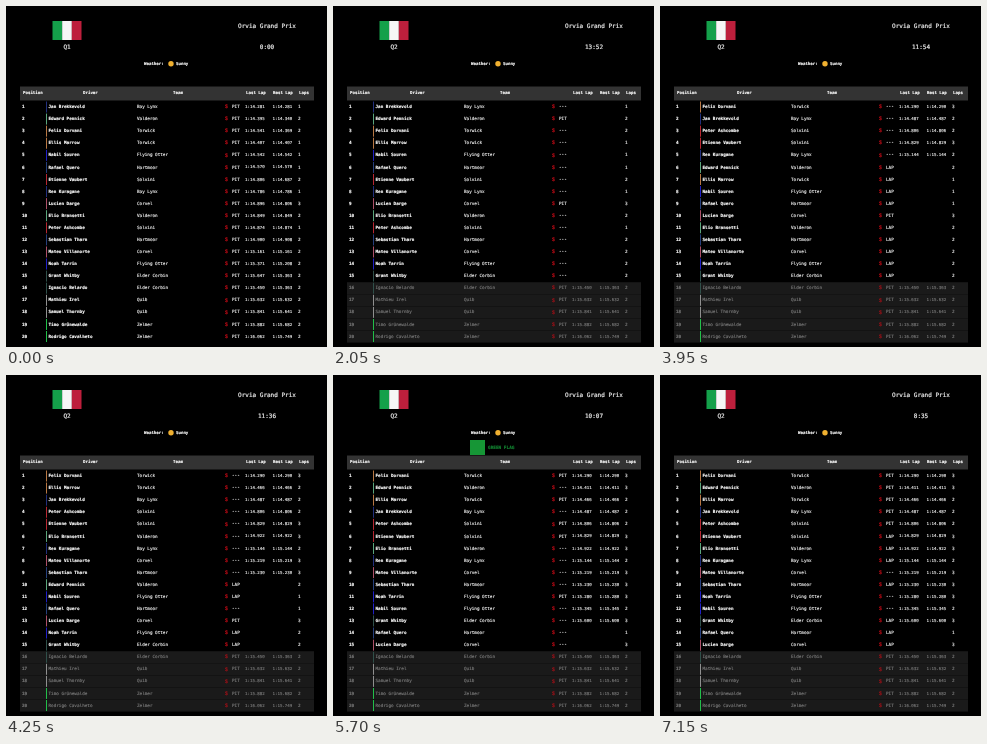
These frames come from a looping animation (321x341 px, 7200 ms). An HTML page with a canvas:

```html
<!DOCTYPE html>
<html lang="en">
<head>
<meta charset="utf-8">
<title>Qualifying board</title>
<style>
html, body { margin: 0; width: 100%; height: 100%; overflow: hidden; background: #000; }
canvas { display: block; width: 321px; height: 341px; }
</style>
</head>
<body>
<canvas id="board"></canvas>
<script>
const W = 321, H = 341, LOOP = 7200, STEP = 50, SESSION_START = 1000;
const ROW_TOP = 101, ROW_PITCH = 12.08, SAFE_ROWS = 15;
const FONT = '"DejaVu Sans Mono", "Liberation Mono", monospace';

const teamColors = {
  'Bay Lynx': '#22307c', 'Valderon': '#5ba67c', 'Torwick': '#b87844',
  'Flying Otter': '#2020c8', 'Hartmoor': '#26407c', 'Solvini': '#b82832',
  'Corvel': '#ac5068', 'Elder Corbin': '#30504a', 'Quib': '#909090', 'Zelmer': '#22c04a'
};

// name | team | last lap | best lap | laps | new time
const entries = `
Jan Brekkevold|Bay Lynx|1:14.281|1:14.281|1|1:14.487
Edward Pennick|Valderon|1:14.395|1:14.340|2|1:14.411
Felix Dorvani|Torwick|1:14.541|1:14.369|2|1:14.290
Ellis Marrow|Torwick|1:14.407|1:14.407|1|1:14.466
Nabil Souren|Flying Otter|1:14.542|1:14.542|1|1:15.345
Rafael Quero|Hartmoor|1:14.570|1:14.570|1|
Etienne Vaubert|Solvini|1:14.806|1:14.687|2|1:14.829
Ren Kuragane|Bay Lynx|1:14.786|1:14.786|1|1:15.144
Lucien Darge|Corvel|1:14.896|1:14.806|3|
Elio Bransetti|Valderon|1:14.849|1:14.849|2|1:14.922
Peter Ashcombe|Solvini|1:14.874|1:14.874|1|1:14.806
Sebastian Tharn|Hartmoor|1:14.900|1:14.908|2|1:15.230
Mateo Villanorte|Corvel|1:15.161|1:15.161|2|1:15.219
Noah Tarrin|Flying Otter|1:15.371|1:15.208|2|1:15.280
Grant Whitby|Elder Corbin|1:15.647|1:15.363|2|1:15.600
Ignacio Belardo|Elder Corbin|1:15.450|1:15.363|2|
Mathieu Irel|Quib|1:15.632|1:15.632|2|
Samuel Thornby|Quib|1:15.841|1:15.641|2|
Timo Grünewalde|Zelmer|1:15.882|1:15.682|2|
Rodrigo Cavalheto|Zelmer|1:16.062|1:15.749|2|`.trim().split('\n');

// end of first run, back in pits, second exit, second flying lap
const runs = [
  [3700, 6100], [4700, 6150], [3650, 4850], [4000, 5000],
  [4400, 5850, 6600], [4100, 4350, 5200, 6600], [3850, 4850, 5750, 7050],
  [3900, 4950, 5550, 6850], [0, 0, 5350, 6700], [4100, 4850, 5400, 6700],
  [3800, 5050], [4250, 5000, 5600, 6900], [4200, 5750, 6500],
  [4300, 5300, 6500], [4550, 5200, 5650, 6950]
];
const OUT_LAP = 2600, FLYING_LAP = 1200;
const phases = ['PIT', '•••', 'LAP', '•••', 'PIT', '•••', 'LAP'];

const drivers = entries.map((line, i) => {
  const [name, team, last, best, laps, fresh] = line.split('|');
  const [finish, ...later] = runs[i] || [];
  const events = finish === undefined ? [] :
    [finish && finish - OUT_LAP, finish && finish - FLYING_LAP, finish, ...later];
  return { name, team, last, best, laps: +laps, fresh, finish, events };
});

const clockKeys = [[1000, 897], [2050, 832], [3500, 743], [3950, 714],
                   [4650, 671], [5700, 607], [7150, 515]];

function clockText(t) {
  if (t < SESSION_START) return '0:00';
  const k = Math.max(1, clockKeys.findIndex(key => key[0] >= t));
  const [t0, a] = clockKeys[k - 1], [t1, b] = clockKeys[k];
  const s = Math.round(a + (b - a) * (t - t0) / (t1 - t0));
  return Math.floor(s / 60) + ':' + String(s % 60).padStart(2, '0');
}

function standings(t) {
  const started = t >= SESSION_START;
  const rows = drivers.map((d, i) => {
    const timed = started && d.fresh && t >= d.finish;
    const out = started && i >= SAFE_ROWS;
    const hidden = started && !out && !timed;
    return {
      ...d, out,
      last: hidden ? '' : timed ? d.fresh : d.last,
      best: hidden ? '' : timed ? d.fresh : d.best,
      laps: d.laps + (timed ? 1 : 0),
      status: phases[started ? d.events.filter(e => t >= e).length : 0],
      key: timed ? d.fresh : '9' + String(i).padStart(2, '0')
    };
  });
  return started ? rows.sort((a, b) => a.key < b.key ? -1 : 1) : rows;
}

const canvas = document.getElementById('board');
const ctx = canvas.getContext('2d');
const scale = window.devicePixelRatio || 1;
canvas.width = W * scale;
canvas.height = H * scale;

function box(x, y, w, h, color) {
  ctx.fillStyle = color;
  ctx.fillRect(x, y, w, h);
}

// A hairline outline gives the regular weight a sturdier stroke.
function text(str, x, y, { size = 4.3, color = '#e8e8e8', bold = false, align = 'left' } = {}) {
  ctx.font = `${bold ? 'bold ' : ''}${size}px ${FONT}`;
  ctx.textAlign = align;
  ctx.fillStyle = ctx.strokeStyle = color;
  ctx.lineWidth = size * 0.04;
  ctx.fillText(str, x, y);
  ctx.strokeText(str, x, y);
}

function drawHeader(t) {
  ['#14a04a', '#f6f6f6', '#bd1f3c'].forEach((c, i) => box(46.5 + i * 9.67, 15, 9.67, 19, c));
  const big = { size: 6, align: 'center' };
  text(t < SESSION_START ? 'Q1' : 'Q2', 61, 41, big);
  text('Orvia Grand Prix', 261, 20.5, big);
  text(clockText(t), 261, 41, big);

  const label = { size: 4.1, bold: true, color: '#fff' };
  text('Weather:', 138, 58, label);
  ctx.fillStyle = '#f0b030';
  ctx.beginPath();
  ctx.arc(165, 57.7, 2.7, 0, Math.PI * 2);
  ctx.fill();
  text('Sunny', 170, 58, label);

  if (t >= 4500 && t < 5200) drawFlag('YELLOW FLAG', 136, 154, '#fcfc20', '#f0f020');
  else if (t >= 5200 && t < 6400) drawFlag('GREEN FLAG', 137, 155, '#169636', '#128030');

  box(14, 80.5, 294, 14, '#333');
  [['Position', 17], ['Driver', 77], ['Team', 167], ['Last Lap', 240],
   ['Best Lap', 267], ['Laps', 293]].forEach(([s, x]) => text(s, x, 87, label));
}

function drawFlag(str, x, textX, fill, ink) {
  box(x, 65, 15, 15, fill);
  text(str, textX, 72.5, { size: 4.4, bold: true, color: ink });
}

function drawRow(d, i) {
  const y = ROW_TOP + i * ROW_PITCH;
  const ink = d.out ? '#747474' : '#e8e8e8';
  const strong = d.out ? '#747474' : '#fff';
  if (d.out) box(14, y - 6, 294, ROW_PITCH, '#1a1a1a');
  text(String(i + 1), 16, y, { bold: true, color: strong });
  box(40, y - 5.5, 1, 11, teamColors[d.team]);
  text(d.name, 42.5, y, { bold: !d.out, color: strong });
  text(d.team, 131, y, { color: ink });
  text('S', 219, y, { size: 4.8, bold: true, color: d.out ? '#a81018' : '#cc0c18' });
  text(d.status, 226, y, { color: d.status === '•••' ? '#a0a0a0' : ink });
  text(d.last, 239, y, { size: 4.1, color: ink });
  text(d.best, 266.5, y, { size: 4.1, color: ink });
  text(String(d.laps), 292, y, { color: ink });
}

function draw(t) {
  ctx.setTransform(scale, 0, 0, scale, 0, 0);
  ctx.textBaseline = 'middle';
  ctx.textRendering = 'geometricPrecision';
  ctx.lineJoin = 'round';
  box(0, 0, W, H, '#000');
  drawHeader(t);
  standings(t).forEach(drawRow);
}

const start = performance.now();
function tick(now) {
  const t = Math.max(0, now - start) % LOOP;
  draw(Math.floor(t / STEP) * STEP);
  requestAnimationFrame(tick);
}
draw(0);
requestAnimationFrame(tick);
</script>
</body>
</html>
```
